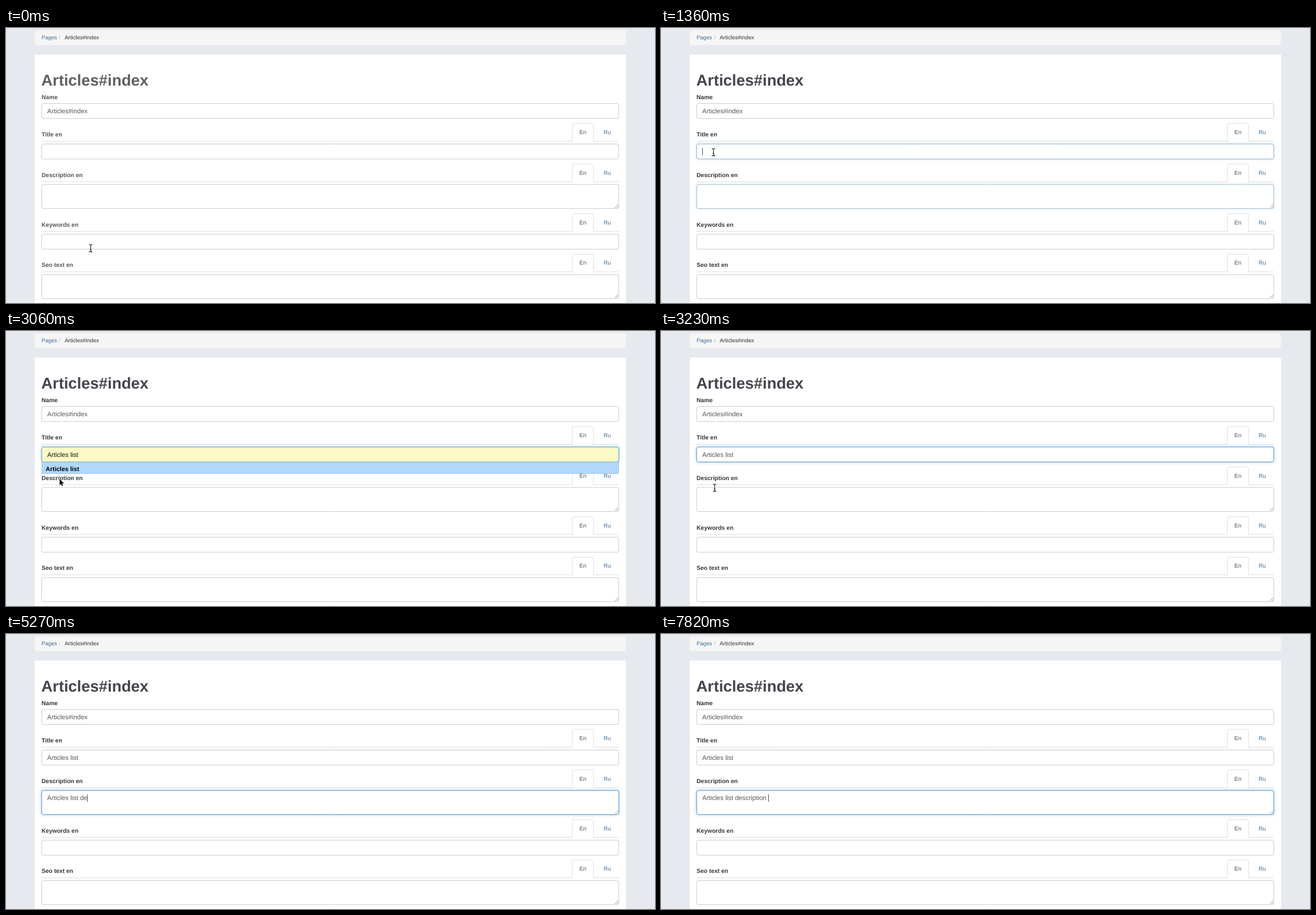
An HTML page with a canvas that plays this animation: 1150 px wide and 487 px high, repeating every 7990 ms.

```html
<!DOCTYPE html>
<html lang="en">
<head>
<meta charset="utf-8">
<title>Page form</title>
<style>
html, body { margin: 0; width: 100%; height: 100%; overflow: hidden; background: #e6e9ee; }
canvas { display: block; width: 1150px; height: 487px; }
</style>
</head>
<body>
<canvas id="stage"></canvas>
<script>
const W = 1150, H = 487, LOOP = 7990, STEP = 170;
const LEFT = 63, RIGHT = 1086;
const FONT = '"Liberation Sans", Arial, sans-serif';
const LINK = '#41709f';

const canvas = document.getElementById('stage');
const ctx = canvas.getContext('2d');
const dpr = window.devicePixelRatio || 1;
canvas.width = W * dpr;
canvas.height = H * dpr;
ctx.scale(dpr, dpr);
ctx.textRendering = 'geometricPrecision';

// Each row hangs from the rule under its label.
const rows = [
  { label: 'Title en', rule: 200.5, height: 27 },
  { label: 'Description en', rule: 272.2, height: 43 },
  { label: 'Keywords en', rule: 360.2, height: 27 },
  { label: 'Seo text en', rule: 431.8, height: 43 }
];
const fieldTop = row => row.rule + 4.7;

// Pointer path: step, x, y
const path = [
  [0, 150, 390], [4, 100, 300], [5, 95, 297], [7, 93, 222], [8, 93, 220],
  [16, 93, 220], [17, 93, 224], [18, 95, 262], [20, 95, 293]
];

const TITLE = 'Articles list';
const DESCRIPTION = 'Articles list description ';
// Steps at which each letter after the first 13 is typed
const keys = [28, 30, 31, 32, 33, 35, 38, 39, 40, 41, 43, 45, 46];

const within = (n, from, to) => n >= from && n <= to;

function text(str, x, y, size, color, weight = 'normal') {
  ctx.font = `${weight} ${size}px ${FONT}`;
  ctx.fillStyle = color;
  ctx.fillText(str, x, y);
}

function line(points, color, width = 1) {
  ctx.beginPath();
  points.forEach(([x, y]) => ctx.lineTo(x, y));
  ctx.strokeStyle = color;
  ctx.lineWidth = width;
  ctx.stroke();
}

function field(top, height, focus = 0, fill = '#fff') {
  ctx.beginPath();
  ctx.roundRect(LEFT + 0.2, top + 0.2, RIGHT - LEFT - 0.4, height - 0.4, 3);
  ctx.save();
  if (focus) {
    ctx.shadowColor = `rgba(102,175,233,${0.6 * focus})`;
    ctx.shadowBlur = 6.5 * dpr;
  }
  ctx.fillStyle = fill;
  ctx.fill();
  ctx.restore();
  ctx.lineWidth = 1;
  ctx.strokeStyle = '#c9c9c9';
  ctx.stroke();
  if (focus) {
    ctx.strokeStyle = `rgba(92,163,219,${focus})`;
    ctx.stroke();
  }
}

function grip(bottom) {
  line([[1079, bottom - 1.5], [1085, bottom - 7.5]], '#777', 0.8);
  line([[1082.5, bottom - 1.5], [1085, bottom - 4]], '#777', 0.8);
}

function tabs(rule) {
  const top = rule - 31.5;
  line([[LEFT, rule], [1003.5, rule]], '#ddd');
  line([[1041, rule], [RIGHT, rule]], '#ddd');
  ctx.beginPath();
  ctx.moveTo(1003.5, rule + 0.5);
  ctx.arcTo(1003.5, top, 1022, top, 3);
  ctx.arcTo(1041, top, 1041, rule, 3);
  ctx.lineTo(1041, rule + 0.5);
  ctx.strokeStyle = '#ddd';
  ctx.stroke();
  text('En', 1016, rule - 12.4, 10.2, '#555');
  text('Ru', 1059, rule - 12.4, 10.2, LINK);
}

function caret(str, rule) {
  ctx.font = `11.5px ${FONT}`;
  const x = 73.5 + ctx.measureText(str).width;
  line([[x, rule + 11.8], [x, rule + 24.8]], '#333', 0.9);
}

function dropdown(hover) {
  ctx.fillStyle = hover ? '#b0d8fd' : '#fff';
  ctx.fillRect(LEFT, 232.5, RIGHT - LEFT, 20.5);
  ctx.strokeStyle = hover ? '#a3c5e2' : '#bbb';
  ctx.lineWidth = 1;
  ctx.strokeRect(LEFT + 0.5, 232.5, RIGHT - LEFT - 1, 20);
  text(TITLE, 70.3, 247.8, 11, '#000', 'bold');
}

function pointerAt(n) {
  const i = path.findIndex(p => p[0] > n);
  if (i < 0) return path[path.length - 1].slice(1);
  const [a, ax, ay] = path[i - 1], [b, bx, by] = path[i];
  const k = (n - a) / (b - a);
  return [ax + (bx - ax) * k, ay + (by - ay) * k];
}

function pointer(n) {
  const [x, y] = pointerAt(n);
  const overField = rows.some(r => within(y, fieldTop(r), fieldTop(r) + r.height));
  ctx.save();
  ctx.translate(x, y);
  if (overField) {
    const beam = new Path2D('M-3 -6.5Q0 -6.5 0 -4.5Q0 -6.5 3 -6.5M0 -5V5M-3 6.5Q0 6.5 0 4.5Q0 6.5 3 6.5M-1.5 2H1.5');
    ctx.strokeStyle = '#fff';
    ctx.lineWidth = 2.4;
    ctx.stroke(beam);
    ctx.strokeStyle = '#111';
    ctx.lineWidth = 1.1;
    ctx.stroke(beam);
  } else {
    const arrow = new Path2D('M0 0V11L2.5 8.7L4.2 12.5L6 11.7L4.3 8H7.7Z');
    ctx.strokeStyle = '#fff';
    ctx.lineWidth = 1.6;
    ctx.stroke(arrow);
    ctx.fillStyle = '#000';
    ctx.fill(arrow);
  }
  ctx.restore();
}

function titleFocus(n) {
  return n === 8 ? 0.5 : within(n, 9, 20) ? 1 : 0;
}

function descriptionFocus(n) {
  return n === 8 ? 0.35 : within(n, 5, 7) || n >= 21 ? 1 : 0;
}

function draw(n) {
  const ink = n ? '#363636' : '#555';
  const open = within(n, 14, 18), hover = n === 18;
  const title = n >= 14 ? TITLE : '';
  const typed = n < 24 ? 0 : 13 + keys.filter(k => k <= n).length;
  const description = DESCRIPTION.slice(0, typed);

  ctx.fillStyle = '#e6e9ee';
  ctx.fillRect(0, 0, W, H);
  ctx.fillStyle = '#f5f5f5';
  ctx.beginPath();
  ctx.roundRect(51, 4, 1047.5, 26.5, 3);
  ctx.fill();
  ctx.fillStyle = '#fff';
  ctx.fillRect(51, 47, 1047.5, H - 47);

  text('Pages', LEFT, 20, 9.7, LINK);
  text('/', 94, 20, 9.7, '#bbb');
  text('Articles#index', 104, 20, 9.8, '#333');
  text('Articles#index', 62.5, 101.5, 27.8, n ? '#43464c' : '#606164', 'bold');
  text('Name', LEFT, 125.8, 10.5, ink, 'bold');
  field(133.5, 27);
  text('Articles#index', 73, 150.7, 11.5, '#555');

  const focus = [titleFocus(n), descriptionFocus(n), 0, 0];
  rows.forEach((row, i) => {
    const top = fieldTop(row);
    text(row.label, LEFT, row.rule - 8.5, 10.5, ink, 'bold');
    tabs(row.rule);
    field(top, row.height, focus[i], i === 0 && hover ? '#fbf9c5' : '#fff');
    if (row.height > 30) grip(top + row.height);
  });

  text(title, 73, 222.5, 11.5, hover ? '#111' : '#555');
  text(description, 73, 294.3, 11.5, '#555');
  if (open) dropdown(hover);

  if (within(n, 5, 7)) caret('', rows[1].rule);
  if (within(n, 8, 10) || within(n, 14, 16)) caret(title, rows[0].rule);
  if (n >= 21 && n !== 27 && !within(n, 36, 37)) caret(description, rows[1].rule);

  if (n < 14 || within(n, 17, 23)) pointer(n);
}

const start = performance.now();
function tick() {
  draw(Math.floor(((performance.now() - start) % LOOP) / STEP));
  requestAnimationFrame(tick);
}
tick();
</script>
</body>
</html>
```
